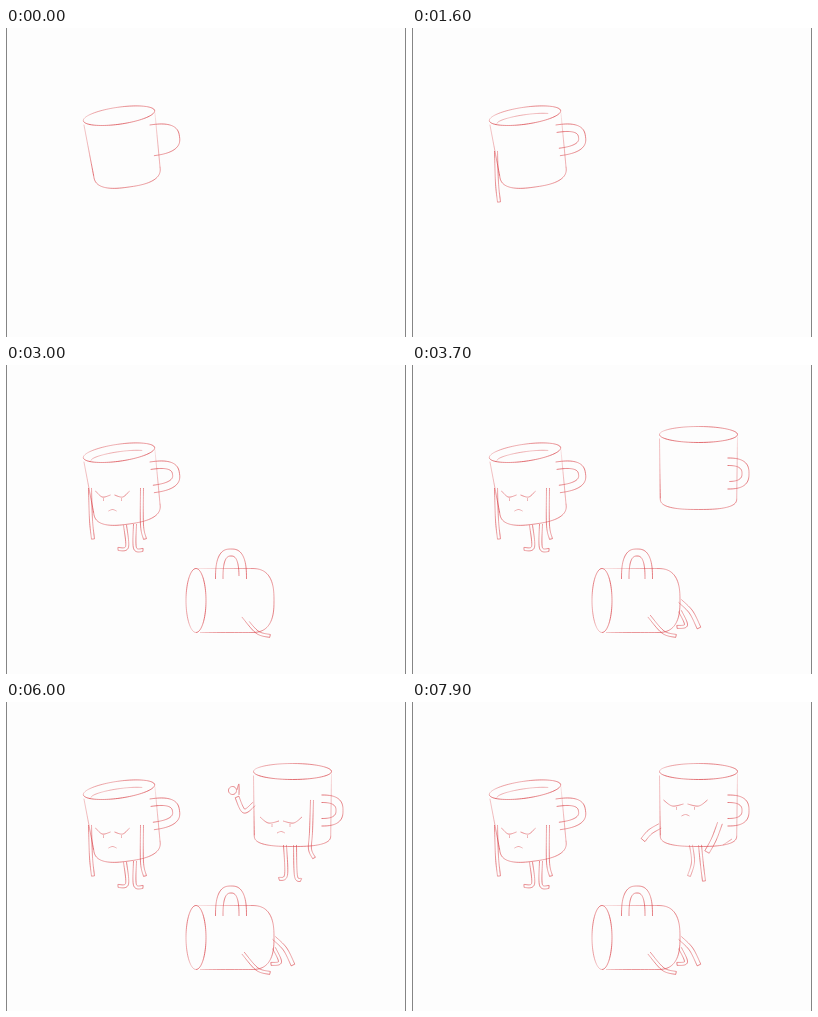
These frames come from a looping animation (400x309 px, 8000 ms). An HTML page with a canvas:

```html
<!DOCTYPE html>
<html>
<head>
<meta charset="utf-8">
<style>
  html, body { margin: 0; width: 100%; height: 100%; overflow: hidden; background: #fdfdfd; }
  canvas { display: block; }
</style>
</head>
<body>
<canvas id="stage" width="400" height="309"></canvas>
<script>
const LOOP = 8000, STEP = 100, { PI, cos, sin, hypot } = Math;
const ctx = document.getElementById('stage').getContext('2d');
const strokes = [];

// A line holds its points and the pencil pressure at both ends
const line = (points, a = .8, b = a) => ({ points, a, b });
const sample = (n, f) => Array.from({ length: n + 1 }, (_, i) => f(i / n));

// Smooth curve through key points
function bend(keys, a, b) {
  const n = keys.length - 1;
  return line(sample(n * 14, u => {
    const i = Math.min(n - 1, Math.floor(u * n)), t = u * n - i;
    const [p, q, r, s] = [i - 1, i, i + 1, i + 2].map(k => keys[Math.max(0, Math.min(n, k))]);
    return [0, 1].map(k => q[k] + t / 2 * (r[k] - p[k]
      + t * (2 * p[k] - 5 * q[k] + 4 * r[k] - s[k] + t * (3 * (q[k] - r[k]) + s[k] - p[k]))));
  }), a, b);
}

// Elliptic arc; a power below 1 makes it squarer
function arc(cx, cy, rx, ry, from = 0, to = 2 * PI, a, b, power = 1) {
  const square = v => Math.sign(v) * Math.abs(v) ** power;
  return line(sample(48, u => {
    const angle = from + (to - from) * u;
    return [cx + rx * square(cos(angle)), cy + ry * square(sin(angle))];
  }), a, b);
}

// Outline of an arm or leg: down one side, back up the other
function limb(joints, width = 3, a = .75) {
  const { points } = bend(joints);
  const side = d => points.map(([x, y], i) => {
    const p = points[Math.max(0, i - 1)], q = points[Math.min(points.length - 1, i + 1)];
    const dx = q[0] - p[0], dy = q[1] - p[1], k = d * width / 2 / hypot(dx, dy);
    return [x - dy * k, y + dx * k];
  });
  return line([...side(1), ...side(-1).reverse()], a);
}

// Mug parts, built upright around the rim centre and then turned
function mug({ x, y, turn = 0, w, ry, h, base, taper = 1, grip }) {
  const c = cos(turn), s = sin(turn), foot = w * taper;
  const put = l => line(l.points.map(([u, v]) => [x + u * c - v * s, y + u * s + v * c]), l.a, l.b);
  const handle = (reach, half) => arc(grip.x, grip.y, reach, half, -PI / 2, PI / 2, .8, .8, .75);
  return {
    rim: [arc(0, 0, w, ry, 0, PI, .9), arc(0, 0, w, ry, PI, 2 * PI, .4, .95)].map(put),
    body: [
      bend([[-w, 4], [-foot, h]], .35, .9),
      arc(0, h, foot, base, PI, 0, .75, .75, .75),
      bend([[w, 2], [foot, h]], .2, .6)
    ].map(put),
    outer: [put(handle(grip.reach, 15.5))],
    inner: [put(handle(grip.reach - 7, 8))],
    coffee: [put(arc(0, 4, w * .8, 5, PI, 1.8 * PI, .5))]
  };
}

// Heavy lids, two pupils and a small mouth
function face(x, y, size, drop) {
  const lid = s => bend([[x + s * size, y - 6], [x + s * size * .6, y], [x + s * 2, y - 2]], .75);
  const pupil = s => bend([[x + s * 9, y + 1], [x + s * 9, y + 4]], .6);
  return [lid(-1), lid(1), pupil(-1), pupil(1),
    bend([[x - 4, y + drop], [x, y + drop - 1.5], [x + 4, y + drop]], .6)];
}

// Draws lines one after another at an even pace; gone is when they are rubbed out
function draw(start, end, lines, gone = LOOP) {
  const size = l => l.points.reduce((sum, p, i, all) =>
    i ? sum + hypot(p[0] - all[i - 1][0], p[1] - all[i - 1][1]) : 0, 0);
  const pace = (end - start) / lines.reduce((sum, l) => sum + size(l), 0);
  for (const l of lines) {
    const time = size(l) * pace;
    strokes.push({ ...l, start, time, gone });
    start += time;
  }
}

const sad = mug({ x: 113, y: 87.7, turn: -.14, w: 36, ry: 8.5, h: 56, base: 16, taper: .93,
  grip: { x: 29, y: 29, reach: 28 } });
draw(-2, -1, [...sad.rim, ...sad.body, ...sad.outer]);
draw(100, 400, sad.inner);
draw(500, 700, [bend([[81, 118], [70, 127], [57, 139]], .3)], 900);
draw(700, 1000, sad.coffee);
draw(1100, 1600, [limb([[84, 123], [85, 155], [87, 174]])]);
draw(1600, 1800, face(106.5, 132, 17, 14));
draw(1700, 2000, [limb([[136, 123], [136, 160], [139, 174]])]);
draw(1900, 2200, [limb([[119, 160], [121, 182], [112, 184]]), limb([[129, 159], [129, 183], [137, 185]])]);

const fallen = mug({ x: 190, y: 235.5, turn: -PI / 2, w: 32, ry: 10, h: 55, base: 23,
  grip: { x: 21.5, y: 35, reach: 30 } });
draw(2100, 2300, [arc(193, 221, 10, 28)], 2500);
draw(2400, 2600, fallen.rim);
draw(2500, 2800, fallen.body);
draw(2800, 3000, [...fallen.outer, ...fallen.inner]);
draw(2900, 3200, [limb([[237, 251], [251, 267], [264, 271]]),
  limb([[268, 236], [279, 247], [287, 263]], 4), limb([[268, 246], [274, 260], [265, 262]])]);

const upright = mug({ x: 286.5, y: 69.5, w: 39, ry: 8, h: 64, base: 11, taper: .98,
  grip: { x: 29, y: 39, reach: 21.5 } });
draw(3100, 3300, upright.rim);
draw(3200, 3500, upright.body);
draw(3400, 3700, [...upright.outer, ...upright.inner]);
draw(3800, 4200, [limb([[248, 102], [238, 109], [231, 95]], 4), arc(226.5, 88.5, 4, 4),
  bend([[231, 88], [233, 82], [233, 93]])], 6700);
draw(4200, 4500, [limb([[279, 143], [280, 173], [273, 177]]), limb([[289, 143], [290, 174], [295, 178]])], 7300);
draw(4400, 4600, [bend([[253, 113], [265, 119], [277, 114]])], 5000);
draw(5000, 5400, face(275, 121, 21, 10), 6500);
draw(5400, 5800, [limb([[306, 98], [305, 130], [304, 147], [308, 156]])], 7000);

// Lowered pose
draw(6500, 6700, face(273.5, 104, 22, 10));
draw(6700, 7000, [limb([[248, 124], [238, 130], [231, 138]], 5)]);
draw(7000, 7200, [limb([[308, 121], [302, 137], [295, 150]], 5), bend([[311, 143], [320, 137]], .6)]);
draw(7300, 7600, [limb([[279, 143], [281, 160], [277, 174]], 3, .6), limb([[288, 143], [290, 163], [292, 179]])]);

function frame() {
  const t = Math.floor(performance.now() % LOOP / STEP) * STEP;
  ctx.clearRect(0, 0, 400, 309);
  ctx.globalAlpha = 1;
  ctx.fillStyle = '#858585';
  ctx.fillRect(0, 0, 1, 309);
  ctx.fillRect(399, 0, 1, 309);
  ctx.strokeStyle = '#d93c42';
  ctx.lineWidth = .85;
  for (const { points, a, b, start, time, gone } of strokes) {
    if (t < start || t >= gone) continue;
    const last = points.length - 1, shown = last * Math.min(1, (t - start) / time);
    for (let i = 1; i <= shown; i++) {
      ctx.globalAlpha = (a + (b - a) * i / last) * (.85 + .15 * sin(i * .4 + points[0][0]));
      ctx.beginPath();
      ctx.moveTo(...points[i - 1]);
      ctx.lineTo(...points[i]);
      ctx.stroke();
    }
  }
  requestAnimationFrame(frame);
}
frame();
</script>
</body>
</html>
```
